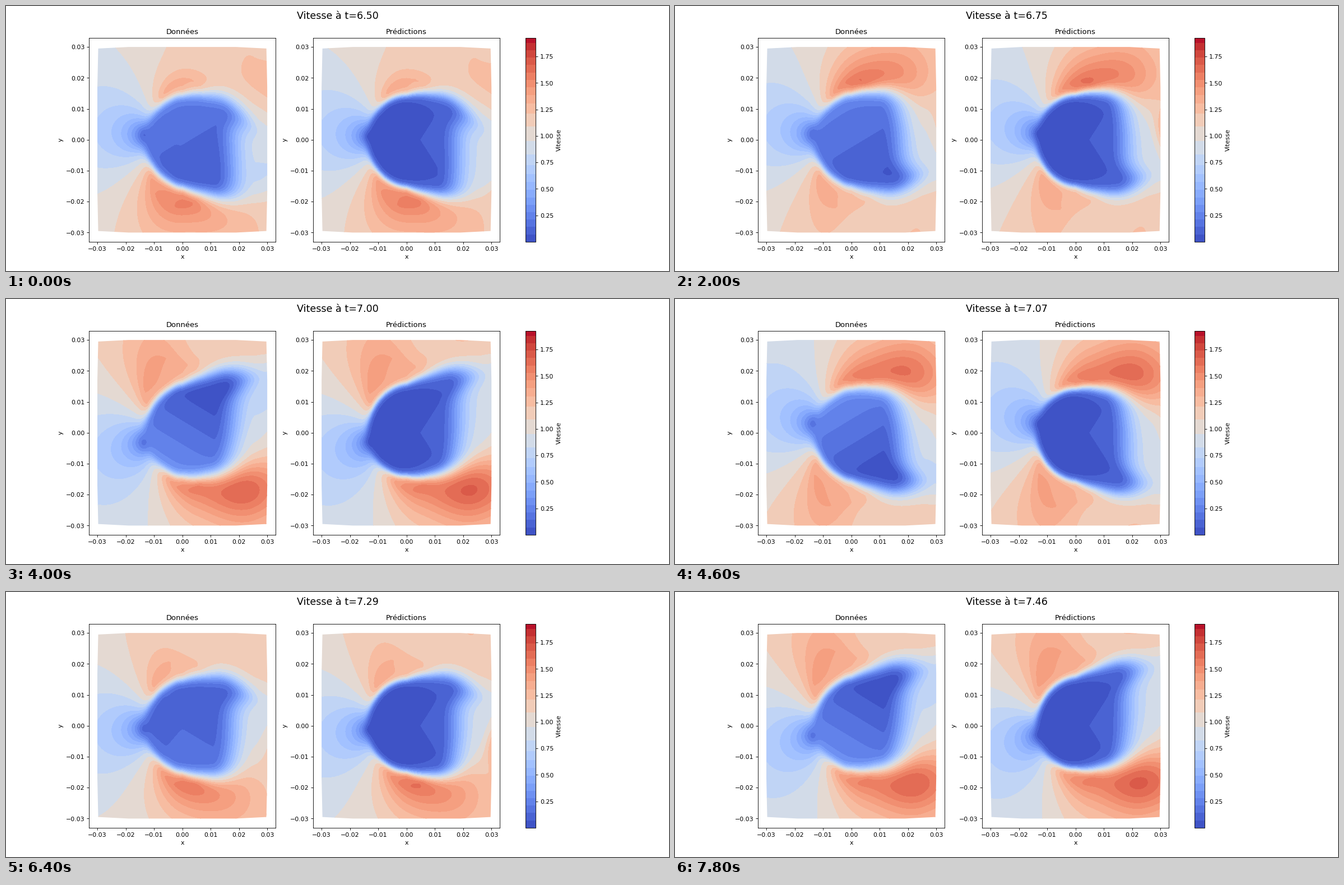
A matplotlib script for the animation above (8000 ms loop, 1183 by 473 pixels).

```python
import numpy as np
import matplotlib.pyplot as plt
from matplotlib.animation import FuncAnimation
from matplotlib.patches import Polygon

FRAMES, INTERVAL = 40, 200
T0, DT = 6.504, 0.0246
CYCLES_PER_FRAME = 0.158      # vortex shedding
VMAX = 1.928
UNIT = 0.01                   # lengths below are in hundredths
RADIUS = 1.3
TAU = 2 * np.pi

xs = np.linspace(-3, 3, 121)
X, Y = np.meshgrid(xs, xs)
RAD = np.hypot(X, Y)
Z = (X + 1j * Y) * np.maximum(RAD, RADIUS) / np.maximum(RAD, 1e-6)
Z[RAD < 1e-6] = RADIUS


def smooth(t):
    t = np.clip(t, 0, 1)
    return t * t * (3 - 2 * t)


def bell(t, width):
    return np.exp(-(t / width) ** 2)


def blob(cx, cy, sx, sy):
    return bell(X - cx, sx) * bell(Y - cy, sy)


def band_levels():
    """Bands are widest around the pale middle of the colour map."""
    levels = [0]
    while levels[-1] < VMAX - .09:
        v = levels[-1]
        levels.append(v + .07 + .07 * bell(v - .95, .25))
    return levels + [VMAX]


def edge(phase):
    """Height of the upper wake edge for x >= 0 and its slope factor."""
    x = np.maximum(xs, 0)
    swing = .15 + .2 * x + .115 * x ** 2
    y = 1.5 + .3 * x - .13 * x ** 2 + swing * np.cos(TAU * (phase - .31))
    y -= bell(phase % 1 - .58, .06) * (x / 3) ** 4   # pinch behind a vortex
    slope = np.gradient(y, xs) * np.minimum(x, 1)
    return y, np.hypot(1, slope)


def outer_flow(phase, lift, predicted):
    """Potential flow with circulation, plus the travelling fast patches."""
    kappa = .65 * lift * (1 - .85 * smooth((X + 1.5) / 2))
    speed = np.abs(1 - RADIUS ** 2 / Z ** 2 + 1j * kappa / Z)
    speed = np.minimum(speed, 1.4)
    speed += .17 * smooth(X / 2.5) - .1 * blob(-3, -.5 * lift, 1.7, 2.2)
    for side, p in ((-1, phase % 1), (1, (phase + .5) % 1)):
        age = (p + .4) % 1
        travel = smooth((age - .2) / .55)
        amp = .05 + .63 * bell(age - .65, .19)
        speed += amp * blob(4 * travel - .7, side * (2.45 - travel), 1.7, 1.15)
        lull = (.5 + .5 * np.cos(TAU * age)) ** 6
        speed -= .17 * lull * blob(.5, side * 2.1, 1.3, 1)
        # fast fluid entering behind the shed vortex, on the other side
        gust = bell(p - .58, .07) * (.45 if predicted else .15)
        speed += gust * blob(3.1, -side * (.22 - 13 * (p - .58)), .4, .8)
    return speed


def body_speed(lift, predicted):
    if predicted:
        return .06 + .02 * np.clip(X - .7 * np.abs(Y), -1.3, 1.3)
    k = abs(lift)
    wedge = smooth((-X - .6 * np.abs(Y) + .1) / .3)
    x, y = np.clip(X, -1.3, 1.3), np.clip(Y, -1.3, 1.3)
    return (.12 + k * (.06 - .055 * x) - .1 * lift * y
            - .06 * max(0, 1 - 2 * k) * wedge)


def speed_field(phase, predicted):
    lift = np.tanh(2.2 * np.sin(TAU * (phase - .035)))
    (yu, su), (yl, sl) = edge(phase), edge(phase + .5)
    up, down = Y - yu, -Y - yl

    # the wake boundary starts on the cylinder and opens towards x = 0
    rad = RAD
    if not predicted:
        rad = RAD + .12 * (np.abs(X) + np.abs(Y) - RAD) * smooth(-X / .5)
    start = np.where(Y > 0, yu[0], yl[0])
    front = 1.42 + (start - 1.42) * np.clip(1 + X / RADIUS, 0, 1)
    dist = np.where(X < 0, rad - front, np.maximum(up / su, down / sl))
    thick = (.06 if predicted else .08) + .05 * np.clip(X, 0, 2.4)
    mix = 1 / (1 + np.exp(-np.clip(dist / thick, -30, 30)))

    # slow fluid trails along both wake edges, longest on the tail side
    reach = 0
    for gap, p in ((up, phase), (down, phase + .5)):
        length = .16 + .24 * np.cos(TAU * (p - .12))
        reach = reach + length * bell(gap + .45, .45)
    cap = .7 + .1 * np.cos(2 * TAU * (phase - .09))
    inner = (body_speed(lift, predicted)
             + cap * smooth((X - 1.1 - reach) / 1.5))

    speed = inner + (outer_flow(phase, lift, predicted) - inner) * mix
    return np.clip(speed, .005, VMAX - .005)


fig, axes = plt.subplots(1, 2, figsize=(15, 6), dpi=78.87)
title = fig.suptitle("", fontsize=16)
corner = [(2.97, 2.95), (3, 1.7), (3, -1.7), (2.97, -2.95), (1.9, -3), (-1.9, -3)]
hull = np.array(corner + [(-x, -y) for x, y in corner]) * UNIT
masks = []
for ax, name in zip(axes, ("Données", "Prédictions")):
    ax.set(title=name, xlabel="x", ylabel="y",
           xlim=(-.033, .033), ylim=(-.033, .033))
    masks.append(ax.add_patch(Polygon(hull, fc="none", ec="none")))
levels = band_levels()
contours = []


def update(frame):
    while contours:
        contours.pop().remove()
    title.set_text(f"Vitesse à t={T0 + DT * frame:.2f}")
    phase = CYCLES_PER_FRAME * frame
    for i, ax in enumerate(axes):
        field = speed_field(phase + .01 * i, predicted=i == 1)
        cs = ax.contourf(X * UNIT, Y * UNIT, field, levels=levels,
                         cmap="coolwarm", vmin=0, vmax=VMAX)
        cs.set_clip_path(masks[i])
        contours.append(cs)
    return contours


update(0)
fig.colorbar(contours[0], ax=list(axes), label="Vitesse",
             spacing="proportional", ticks=np.arange(.25, 1.8, .25))

anim = FuncAnimation(fig, update, frames=FRAMES, interval=INTERVAL,
                     init_func=lambda: update(0), repeat=True, repeat_delay=0,
                     blit=False)
plt.show()
```
